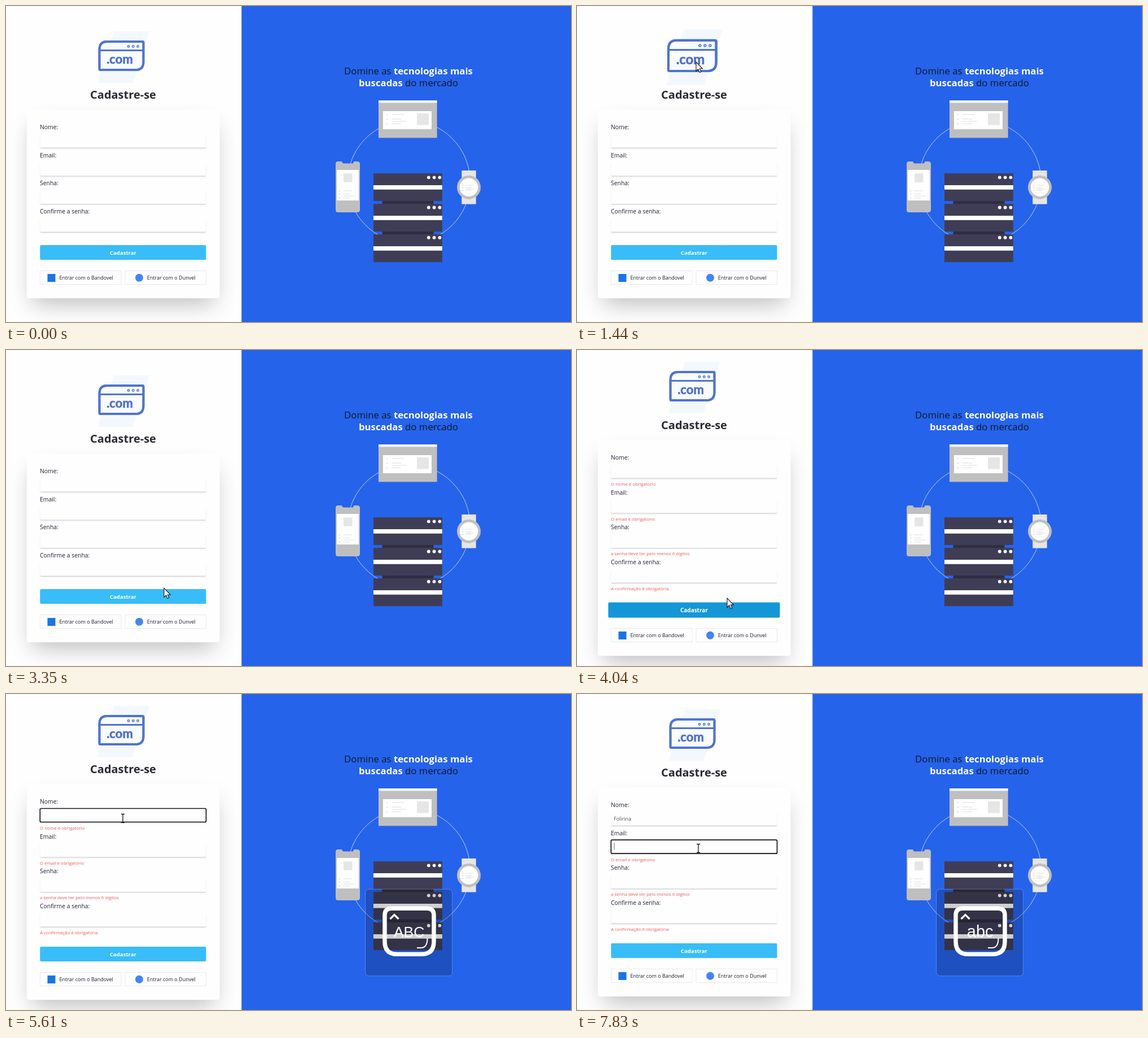
These frames come from a looping animation (1001 px wide and 559 px high, 8 s). An HTML page:

```html
<!DOCTYPE html>
<html lang="pt-BR">
<head>
<meta charset="utf-8">
<title>Cadastre-se</title>
<style>
  html, body { margin: 0; width: 100%; height: 100%; overflow: hidden; background: #fefefe; }
  svg { display: block; width: 100%; height: 100%; }
  text { font-family: "Open Sans", "Noto Sans", sans-serif; white-space: pre; }
  .title { font-size: 20px; font-weight: 700; fill: #2b2b33; text-anchor: middle; }
  .label { font-size: 10.4px; fill: #1f2033; }
  .error { font-size: 7.95px; fill: #ef5555; }
  .value { font-size: 9px; fill: #52525b; }
  .social { font-size: 9px; fill: #1b1b2b; }
  .send { font-size: 9.65px; font-weight: 700; fill: #fff; text-anchor: middle; }
  .pitch { font-size: 16.75px; fill: #111827; text-anchor: middle; }
  .pitch tspan { font-weight: 700; fill: #fff; }
  .com { font: 700 22px Lato, "Open Sans", sans-serif; fill: #4f70c9; stroke: #4f70c9; stroke-width: .6; text-anchor: middle; }
  .caps { font-family: "Liberation Sans", Arial, sans-serif; fill: #fff; text-anchor: middle; }
</style>
</head>
<body>
<svg viewBox="0 0 1001 559" preserveAspectRatio="none">
  <defs>
    <filter id="soft" x="-30%" y="-30%" width="160%" height="160%"><feGaussianBlur stdDeviation="20"/></filter>
    <filter id="thin" x="-5%" y="-40%" width="110%" height="180%"><feGaussianBlur stdDeviation="1.1"/></filter>
  </defs>
  <rect width="1001" height="559" fill="#fefefe"/>

  <rect id="cardShadow" x="46.5" width="322.5" rx="4" opacity=".25" filter="url(#soft)"/>
  <rect id="card" x="37" width="341.5" rx="4" fill="#fefefe"/>

  <g id="head">
    <g id="logo">
      <path d="M191 45H254L224 136H162Z" fill="#f3f8fe"/>
      <path id="frame" d="M179 63H241.5Q243.5 63 243.5 65V99Q243.5 113 229.500 113H167.500Q165.500 113 165.500 111V77Q165.500 63 179 63Z" fill="#f8fbff"/>
      <path d="M179 63H243.500V78H165.500V77Q165.500 63 179 63Z" fill="#58c6e2"/>
      <g fill="none" stroke="#4f74cd">
        <use href="#frame" stroke-width="3.8" style="fill:none"/>
        <path d="M179 63H241.500Q243.500 63 243.500 65V99Q243.500 113 229.500 113H167.500Q165.500 113 165.500 111V77Q165.500 63 179 63Z" stroke-width="3.8"/>
        <path d="M165.500 78.500H243.500" stroke-width="3"/>
        <g stroke-width="1.5"><circle cx="217" cy="71.500" r="1.700"/><circle cx="225.300" cy="71.500" r="1.700"/><circle cx="233.600" cy="71.500" r="1.700"/></g>
      </g>
      <text class="com" x="201.500" y="102">.com</text>
    </g>
    <text class="title" x="207.500" y="163.500">Cadastre-se</text>
  </g>

  <g id="rows"></g>

  <g id="foot">
    <g id="send">
      <rect id="sendBox" x="60.300" y="423" width="294.200" height="26" rx="2"/>
      <text class="send" x="207.400" y="440">Cadastrar</text>
    </g>
    <g fill="#fefefe" stroke="#e7e9ee">
      <rect x="60.500" y="468.500" width="143.500" height="24"/>
      <rect x="211" y="468.500" width="143.500" height="24"/>
    </g>
    <rect x="73.500" y="474" width="14" height="14" fill="#1b74e4"/>
    <circle cx="236" cy="480.700" r="7" fill="#4285f4"/>
    <text class="social" x="94.500" y="483.900">Entrar com o Bandovel</text>
    <text class="social" x="249.700" y="483.900">Entrar com o Dunvel</text>
  </g>

  <rect id="focus" x="60.300" width="294.200" height="24" rx="2" fill="none" stroke="#15151c" stroke-width="1.700"/>
  <text id="value" class="value" x="65"></text>
  <rect id="caret" width="1" height="12.500" fill="#777"/>

  <rect x="417.300" width="584" height="559" fill="#2563eb"/>
  <text class="pitch" x="713" y="120.500">Domine as <tspan>tecnologias mais</tspan></text>
  <text class="pitch" x="713" y="142"><tspan>buscadas</tspan> do mercado</text>

  <circle cx="713.800" cy="311" r="108.500" fill="none" stroke="#cfd6ea" stroke-width=".9"/>
  <g id="screen">
    <rect x="660" y="167" width="103.600" height="66.300" fill="#bfbfbf"/>
    <rect x="660" y="167" width="103.600" height="4.300" fill="#fff"/>
    <rect x="668" y="186" width="86" height="32" fill="#fff"/>
    <rect x="728" y="190" width="21" height="20.500" fill="#e6e6e6"/>
  </g>
  <g id="phone">
    <path d="M588.500 275H594.500Q595.500 275 595.700 276.500Q596 278.500 598 278.500H613.500Q615.500 278.500 615.800 276.500Q616 275 617 275H622.500Q627 275 627 279.500V360.500Q627 365 622.500 365H588.500Q584 365 584 360.500V279.500Q584 275 588.500 275Z" fill="#bfbfbf"/>
    <rect x="586" y="290" width="39" height="54" fill="#fff"/>
    <rect x="598" y="296.300" width="15.500" height="15.500" fill="#e6e6e6"/>
  </g>
  <g id="watch">
    <rect x="807.300" y="291" width="25.400" height="59.500" fill="#e6e6e6"/>
    <circle cx="820" cy="320.700" r="21" fill="#bfbfbf"/>
    <circle cx="820" cy="320.700" r="16.300" fill="#fff"/>
  </g>
  <g id="servers"></g>

  <g id="caps">
    <rect x="636.700" y="345.300" width="153.800" height="153.400" rx="6" fill="#000" fill-opacity=".19" stroke="#fff" stroke-opacity=".25"/>
    <g fill="none" stroke="#fff">
      <path d="M683 379.300H746Q758 379.300 758 391.300V438Q758 460.300 736 460.300H693Q671 460.300 671 438V391.300Q671 379.300 683 379.300Z" stroke-width="7.500"/>
      <path d="M680.500 398L688 390.500L695.500 398" stroke-width="3.200"/>
      <path d="M728 449H735Q746.500 449 746.500 432" stroke-width="2"/>
    </g>
    <text id="capsText" class="caps" x="714.200" y="430"></text>
  </g>

  <g id="pointer">
    <path id="arrow" d="M0 0V16.200L3.700 12.800L6.200 18.500L8.800 17.400L6.400 11.800H11.300Z" fill="#fff" stroke="#111" stroke-width="1.100"/>
    <path id="beam" d="M-3 -7.500H-1Q0 -7.500 0 -6.500Q0 -7.500 1 -7.500H3M0 -6.500V6.500M-3 7.500H-1Q0 7.500 0 6.500Q0 7.500 1 7.500H3" fill="none" stroke="#111" stroke-width="1.300"/>
  </g>
</svg>
<script>
const LOOP = 8000, ROW = 49.7, FIELD_TOP = 226.5, FIELD_H = 24;
const SUBMIT = 3910, FOCUS_NAME = 4950, CAPS_ON = 5610, CAPS_OFF = 5880, FOCUS_EMAIL = 7690;
const NAME = 'Folirina';
const KEYS = [5810, 6080, 6140, 6420, 6490, 6620, 6890, 7020];
const FIELDS = [
  ['Nome:', 'O nome é obrigatório'],
  ['Email:', 'O email é obrigatório'],
  ['Senha:', 'a senha deve ter pelo menos 6 dígitos'],
  ['Confirme a senha:', 'A confirmação é obrigatória']
];
// time, x, y of the pointer's hot spot
const PATH = [
  [530, 950, 523], [700, 800, 340], [890, 600, 155], [1050, 430, 92], [1200, 270, 94], [1300, 211, 99],
  [1910, 211, 99], [2150, 226, 118], [2400, 249, 144], [2670, 257, 166], [2740, 258, 172],
  [2950, 268, 250], [3150, 279, 345], [3350, 280, 421], [3490, 275, 440], [3900, 266, 439],
  [4390, 266, 439], [4560, 264, 370], [4700, 263, 295], [4850, 225, 235], [4940, 208, 220],
  [5209, 208, 220], [5210, 207, 220], [6689, 207, 220], [6690, 212, 230],
  [7420, 212, 230], [7690, 215, 273], [8000, 215, 273]
];

const $ = id => document.getElementById(id);
const clamp = v => Math.min(1, Math.max(0, v));
const mix = (a, b, k) => a + (b - a) * k;
const show = (node, on) => node.setAttribute('visibility', on ? 'visible' : 'hidden');
const move = (node, y) => node.setAttribute('transform', `translate(0 ${y})`);

function add(parent, tag, attrs, text) {
  const node = document.createElementNS('http://www.w3.org/2000/svg', tag);
  for (const key in attrs) node.setAttribute(key, attrs[key]);
  if (text) node.textContent = text;
  return parent.appendChild(node);
}

// cubic-bezier(.4, 0, .2, 1)
function ease(p) {
  p = clamp(p);
  let lo = 0, hi = 1;
  for (let i = 0; i < 20; i++) {
    const u = (lo + hi) / 2, v = 1 - u;
    if (1.2 * v * v * u + .6 * v * u * u + u ** 3 < p) lo = u; else hi = u;
  }
  return 3 * (1 - lo) * lo * lo + lo ** 3;
}
const hover = (t, enter, leave) => ease((t - enter) / 300) - ease((t - leave) / 300);

const rows = FIELDS.map(([label, error], i) => {
  const g = add($('rows'), 'g', {}), y = i * ROW;
  add(g, 'text', { class: 'label', x: 60, y: 218 + y }, label);
  add(g, 'rect', { x: 61, y: FIELD_TOP + 3 + y, width: 292.8, height: FIELD_H - 1.8, opacity: .22, filter: 'url(#thin)' });
  add(g, 'rect', { x: 60.3, y: FIELD_TOP + y, width: 294.2, height: FIELD_H, rx: 2, fill: '#fefefe' });
  return { g, error: add(g, 'text', { class: 'error', x: 60, y: 263.8 + y }, error) };
});

function lines(parent, x, gap, list) {
  for (const [y, w, dot] of list) {
    if (dot) add(parent, 'circle', { cx: x, cy: y, r: 1.2, fill: '#e0e0e0' });
    add(parent, 'rect', { x: x + gap, y: y - .5, width: w, height: 1, fill: '#dedede' });
  }
}
lines($('screen'), 675, 8, [[192, 22, 1], [200, 17, 1], [204, 25, 0], [208.3, 17, 1]]);
lines($('phone'), 591, 6, [[327, 16, 1], [332.5, 12, 1], [336, 19, 0], [339.3, 12, 1]]);
lines($('watch'), 809.5, 5, [[317, 13, 1], [321.5, 10, 1], [324, 15, 0], [326.3, 10, 1]]);

for (let i = 0; i < 3; i++) {
  const s = $('servers'), y = 296 + 54 * i;
  if (i) add(s, 'rect', { x: 666.5, y: y - 5, width: 91, height: 5, fill: '#2f2e41' });
  add(s, 'rect', { x: 651, y, width: 121.8, height: 49, fill: '#3f3d56' });
  add(s, 'rect', { x: 651, y: y + 21, width: 121.8, height: 7.7, fill: '#fff' });
  for (const x of [748.8, 758.6, 768.4])
    add(s, 'circle', { cx: x, cy: 303.3 + 53.2 * i, r: 2.9, fill: '#fff' });
}

function pointerAt(t) {
  const i = Math.max(1, PATH.findIndex(p => p[0] > t));
  const a = PATH[i - 1], b = PATH[i], k = clamp((t - a[0]) / (b[0] - a[0]));
  return [mix(a[1], b[1], k), mix(a[2], b[2], k)];
}

function draw(t) {
  const typed = KEYS.filter(k => k <= t).length;
  const errors = FIELDS.map((_, i) => t >= SUBMIT && !(i === 0 && typed));
  const count = errors.filter(Boolean).length, lift = -6 * count;

  // each message makes the centred column 12 px taller
  const tops = [];
  let y = lift;
  rows.forEach((row, i) => {
    move(row.g, y);
    show(row.error, errors[i]);
    tops.push(FIELD_TOP + i * ROW + y);
    if (errors[i]) y += 12;
  });
  move($('head'), lift);
  move($('foot'), -lift);
  $('card').setAttribute('y', 183 + lift);
  $('card').setAttribute('height', 334 - 2 * lift);
  $('cardShadow').setAttribute('y', 212.5 + lift);
  $('cardShadow').setAttribute('height', 315 - 2 * lift);

  const grow = (id, cx, cy, s) =>
    $(id).setAttribute('transform', `translate(${cx} ${cy}) scale(${s}) translate(${-cx} ${-cy})`);
  grow('logo', 207.5, 89, 1 + .1 * hover(t, 1270, 2130));
  const press = hover(t, 3430, 3955);
  grow('send', 207.4, 436, 1 + .05 * press);
  const tint = [[56, 2], [189, 132], [248, 199]].map(c => Math.round(mix(c[0], c[1], press)));
  $('sendBox').setAttribute('fill', `rgb(${tint})`);

  const onEmail = t >= FOCUS_EMAIL, focused = t >= FOCUS_NAME;
  const top = tops[onEmail ? 1 : 0];
  show($('focus'), focused);
  $('focus').setAttribute('y', top);
  $('value').textContent = NAME.slice(0, typed);
  $('value').setAttribute('y', tops[0] + 15.3);
  const last = Math.max(...[FOCUS_NAME, ...KEYS, FOCUS_EMAIL].filter(e => e <= t));
  show($('caret'), focused && (t - last) % 1060 < 530);
  $('caret').setAttribute('x', typed && !onEmail ? 65.3 + $('value').getComputedTextLength() : 65.5);
  $('caret').setAttribute('y', top + 5);

  show($('caps'), t >= CAPS_ON);
  const upper = t < CAPS_OFF;
  $('capsText').textContent = upper ? 'ABC' : 'abc';
  $('capsText').setAttribute('font-size', upper ? 26.5 : 29);

  const [px, py] = pointerAt(t), seen = t >= PATH[0][0];
  const onTitle = px > 148 && px < 267 && py > 142 + lift && py < 171 + lift;
  const onField = px > 60 && px < 355 && tops.some(f => py >= f && py <= f + FIELD_H);
  const beam = onTitle || onField;
  $('pointer').setAttribute('transform', `translate(${px} ${py})`);
  show($('arrow'), seen && !beam);
  show($('beam'), seen && beam);
}

const start = performance.now();
function tick() {
  draw((performance.now() - start) % LOOP);
  requestAnimationFrame(tick);
}
tick();
</script>
</body>
</html>
```
